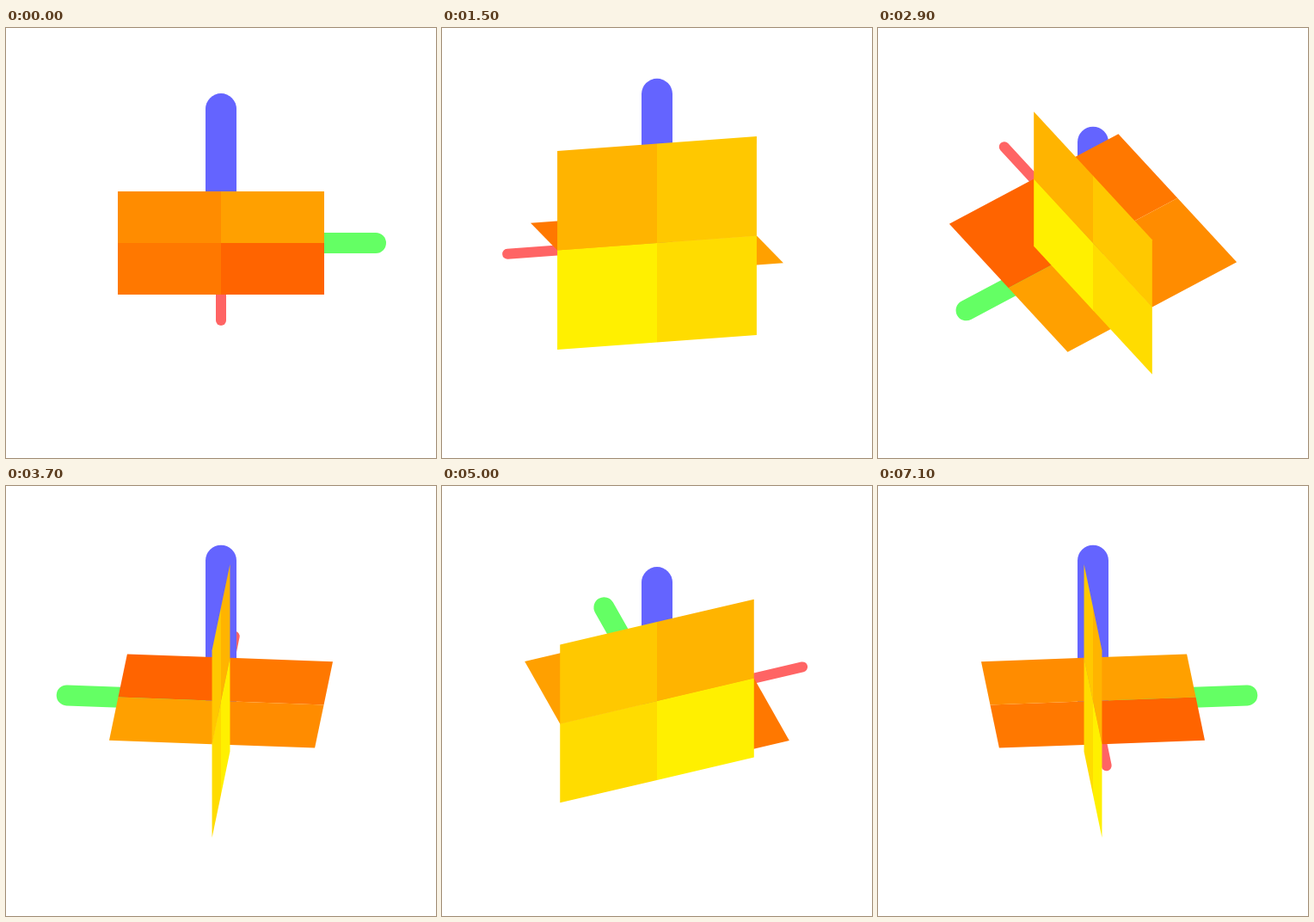
An HTML page with a canvas for the animation above (7.2 s loop, 500x500 px).

```html
<!DOCTYPE html>
<html lang="en">
<head>
<meta charset="utf-8">
<title>Rotating planes</title>
<style>
  html, body { margin: 0; width: 100%; height: 100%; overflow: hidden; background: #fff; }
  canvas { display: block; }
</style>
</head>
<body>
<canvas id="stage" width="500" height="500"></canvas>
<script>
const ctx = document.getElementById('stage').getContext('2d');
const RAD = Math.PI / 180;
const STEP = 100, STEPS = 72;
const SIZE = 120, AXIS = 180;

// Returns a projection for points given along the red, green and blue axes.
function camera(deg) {
  const turn = deg * RAD;
  const tilt = (30 + 20 * Math.sin(3 * turn)) * RAD;
  const s = Math.sin(turn), c = Math.cos(turn);
  return (r, g, b) => [
    250 + g * c - r * s,
    250 + (g * s + r * c) * Math.sin(tilt) - b * Math.cos(tilt)
  ];
}

function axis(end, width, color) {
  ctx.beginPath();
  ctx.moveTo(250, 250);
  ctx.lineTo(...end);
  ctx.lineWidth = width;
  ctx.strokeStyle = color;
  ctx.stroke();
}

// Four square tiles around the centre, coloured in turn.
function plane(place, green) {
  [[1, 1], [1, -1], [-1, -1], [-1, 1]].forEach(([i, j], n) => {
    const u = i * SIZE, v = j * SIZE;
    ctx.beginPath();
    ctx.moveTo(...place(0, 0));
    ctx.lineTo(...place(u, 0));
    ctx.lineTo(...place(u, v));
    ctx.lineTo(...place(0, v));
    ctx.closePath();
    ctx.fillStyle = `rgb(255, ${green + 20 * n}, 0)`;
    ctx.fill();
  });
}

function draw(deg) {
  const project = camera(deg);
  ctx.fillStyle = '#fff';
  ctx.fillRect(0, 0, 500, 500);
  ctx.lineCap = 'round';
  axis(project(AXIS, 0, 0), 12, '#ff6464');
  axis(project(0, AXIS, 0), 24, '#64ff64');
  axis(project(0, 0, AXIS), 36, '#6464ff');
  plane((u, v) => project(u, v, 0), 100);
  plane((u, v) => project(v, 0, u), 180);
}

function tick() {
  const step = Math.floor(performance.now() / STEP) % STEPS;
  draw(step * 360 / STEPS);
  requestAnimationFrame(tick);
}
tick();
</script>
</body>
</html>
```
